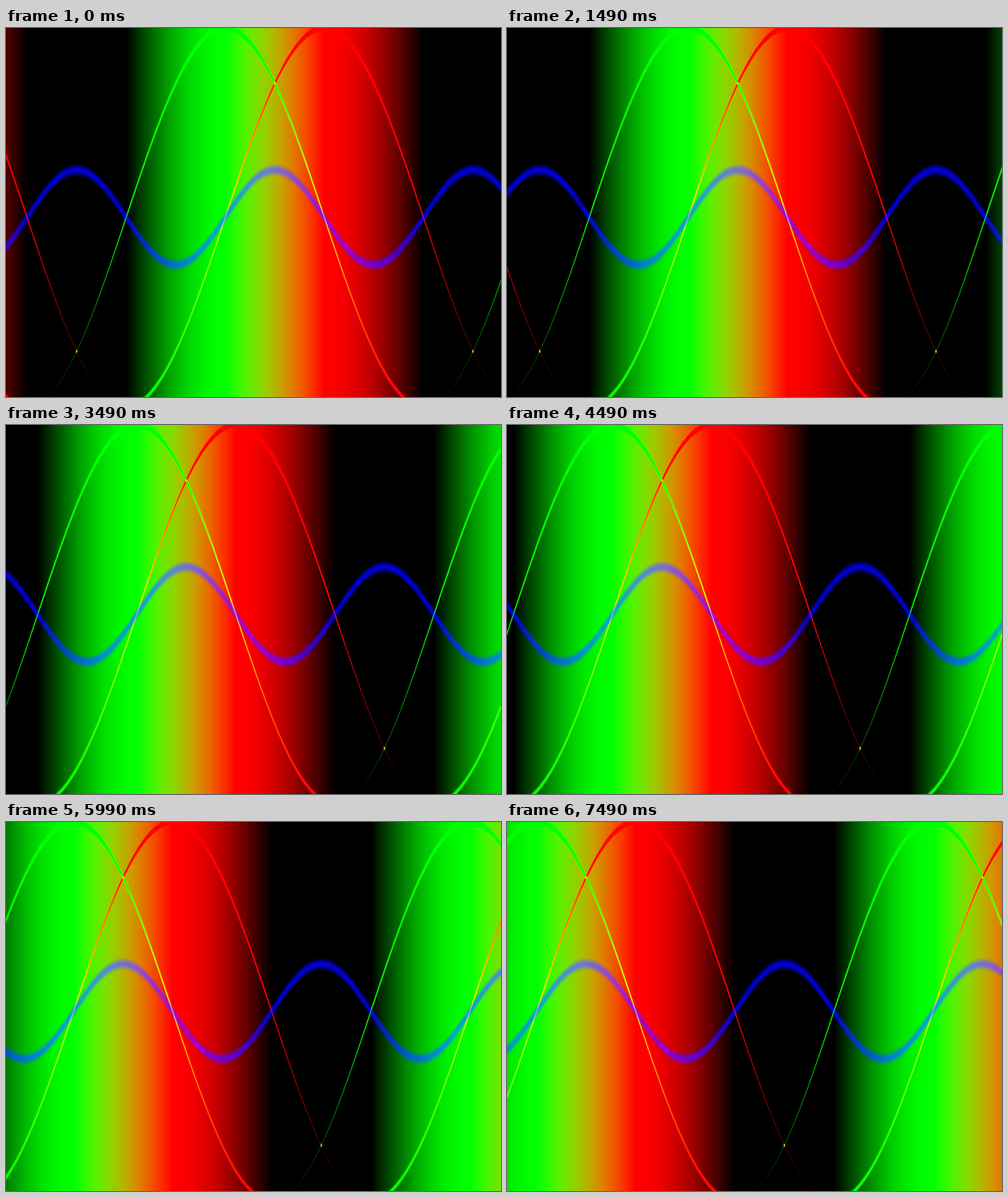
Animation of 607x452 px, one loop 7990 ms. Source, as an HTML page with a canvas:

```html
<!DOCTYPE html>
<html lang="en">
<head>
<meta charset="utf-8">
<title>RGB waves</title>
<style>
  html, body { margin: 0; width: 100%; height: 100%; overflow: hidden; background: #000; }
  canvas { display: block; width: 607px; height: 452px; }
</style>
</head>
<body>
<canvas id="stage" width="607" height="452"></canvas>
<script>
const W = 607, H = 452;
const LOOP = 7990, STEP = 500;
const PERIOD = 486, SHIFT = 15.5, START = 329.6;
const MID = 232, AMP = 232, THIN = 4.7, THICK = 9.3;

const ctx = document.getElementById('stage').getContext('2d');
const image = ctx.createImageData(W, H);
const px = image.data;   // clamps every channel to 0..255

// Soft line profile: 1 on the curve, 0 at the given vertical distance
function line(dist, width) {
  const t = 1 - Math.abs(dist) / width;
  return t <= 0 ? 0 : t * t * (3 - 2 * t);
}

const gate = v => Math.min(1, Math.max(0, v) * 3);

function draw(step) {
  const peak = START - SHIFT * step;
  for (let x = 0; x < W; x++) {
    const a = (x + 0.5 - peak) * 2 * Math.PI / PERIOD;
    const red = Math.cos(a - Math.PI / 4);
    const green = Math.cos(a + Math.PI / 4);
    const yRed = MID - AMP * red;
    const yGreen = MID - AMP * green;
    const yBlue = MID - AMP / 4 * Math.cos(2 * a);
    for (let y = 0; y < H; y++) {
      const yc = y + 0.5;
      const pr = line(yc - yRed, THIN);
      const pg = line(yc - yGreen, THIN);
      const pb = line(yc - yBlue, THICK);
      // each line lifts its own channel and pushes the other by its height
      const r = red + pr - pg * green * gate(Math.max(red, pr));
      const g = green + pg - pr * red * gate(Math.max(green, pg));
      const dim = 255 * (1 - 0.38 * pb);
      const i = (y * W + x) * 4;
      px[i] = Math.min(1, r) * dim;
      px[i + 1] = Math.min(1, g) * dim;
      px[i + 2] = 215 * pb;
      px[i + 3] = 255;
    }
  }
  ctx.putImageData(image, 0, 0);
}

let shown = -1;
function tick(now) {
  const t = now % LOOP;
  const step = t < STEP ? 0 : Math.floor((t + 10) / STEP);
  if (step !== shown) draw(shown = step);
  requestAnimationFrame(tick);
}

draw(shown = 0);
let begin;
requestAnimationFrame(function first(now) {
  begin = now;
  requestAnimationFrame(function loop(t) {
    tickOnce(t - begin);
    requestAnimationFrame(loop);
  });
});

function tickOnce(elapsed) {
  const t = elapsed % LOOP;
  const step = t < STEP ? 0 : Math.floor((t + 10) / STEP);
  if (step !== shown) draw(shown = step);
}
</script>
</body>
</html>
```
